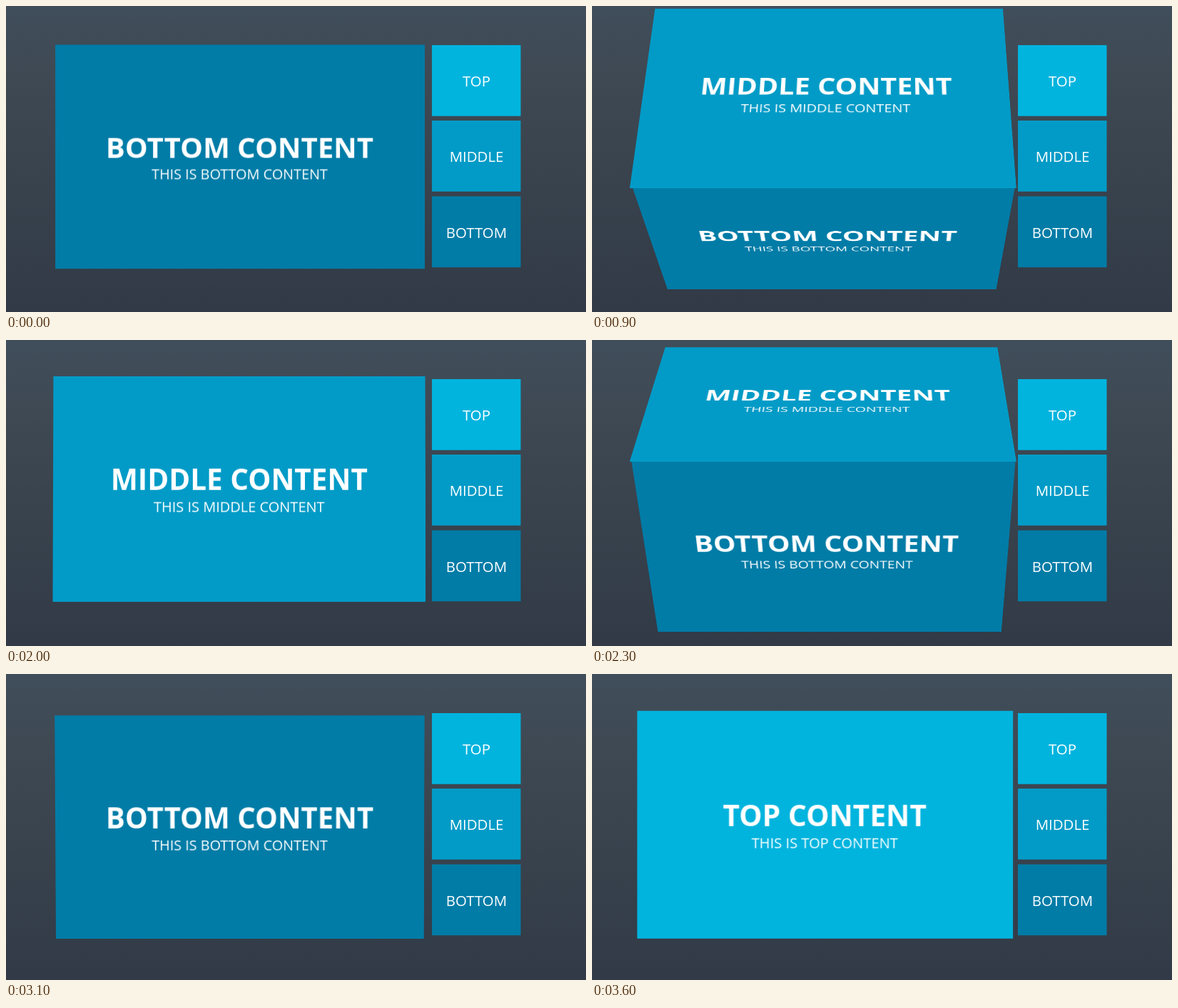
An HTML page that plays this animation: 813x430 px, repeating every 4600 ms.

```html
<!DOCTYPE html>
<html lang="en">
<head>
<meta charset="utf-8">
<title>Cube tabs</title>
<style>
  html, body { margin: 0; width: 100%; height: 100%; overflow: hidden; }
  body { background: #323b47; }
  .stage {
    position: relative; width: 813px; height: 430px; overflow: hidden;
    background: linear-gradient(#404e5b, #3e4852 28%, #313a46);
    color: #fff; font-family: "Open Sans", "Noto Sans", sans-serif;
  }
  .scene {
    position: absolute; inset: 0;
    perspective: 1620px; perspective-origin: 406.5px 211.3px;
  }
  .cube {
    position: absolute; left: 65.8px; top: 52.8px; width: 521.6px; height: 317px;
    transform-style: preserve-3d;
  }
  .face { position: absolute; inset: 0; backface-visibility: hidden; }
  svg { position: absolute; left: 0; top: 0; display: block; }
  text { fill: #fff; text-anchor: middle; }
  .title { font-size: 40.5px; font-weight: 700; }
  .sub { font-size: 20px; font-weight: 500; }
  .tab { font-size: 20.4px; font-weight: 500; }
</style>
</head>
<body>
<div class="stage">
  <svg id="tabs" width="813" height="430"></svg>
  <div class="scene"><div class="cube" id="cube"></div></div>
</div>
<script>
  const LOOP = 4600, STEP = 100, AXIS = 163.5;

  // angle: how the face is turned on the cube, depth: distance from the axis
  const faces = [
    { name: 'TOP', color: '#01b4de', angle: 90, depth: 176, y: 55 },
    { name: 'MIDDLE', color: '#029bc7', angle: 0, depth: AXIS, y: 161 },
    { name: 'BOTTOM', color: '#007ca7', angle: -90, depth: 148.5, y: 267.5 }
  ];

  // lead: share of the turn already done at its first step
  const turns = [
    { at: 600, from: 90, to: 0, lead: 0.08 },
    { at: 2000, from: 0, to: 90, lead: 0.06 },
    { at: 3100, from: 90, to: -90, lead: 0.06 }
  ];

  const cube = document.getElementById('cube');
  const tabs = document.getElementById('tabs');

  for (const { name, color, angle, depth, y } of faces) {
    tabs.innerHTML += `
      <rect x="597" y="${y}" width="124.5" height="99.7" fill="${color}"/>
      <text class="tab" x="659.5" y="${y + 58}">${name}</text>`;
    cube.innerHTML += `
      <div class="face" style="background:${color};transform:rotateX(${angle}deg) translateZ(${depth}px)">
        <svg width="522" height="317">
          <text class="title" x="260.8" y="160.4">${name} CONTENT</text>
          <text class="sub" x="260.8" y="191.2">THIS IS ${name} CONTENT</text>
        </svg>
      </div>`;
  }

  const ease = x => (1 - Math.cos(Math.PI * x)) / 2;

  function angleAt(time) {
    let angle = turns[0].from;
    for (const { at, from, to, lead } of turns) {
      if (time < at) break;
      const step = Math.floor((time - at) / STEP);
      const done = step < 5 ? ease(lead + step * 0.168) : 1;
      angle = from + (to - from) * done;
    }
    return angle;
  }

  function draw(time) {
    cube.style.transform = `translateZ(${-AXIS}px) rotateX(${angleAt(time)}deg)`;
  }

  const start = performance.now();
  function tick() {
    draw((performance.now() - start) % LOOP);
    requestAnimationFrame(tick);
  }
  tick();
</script>
</body>
</html>
```
